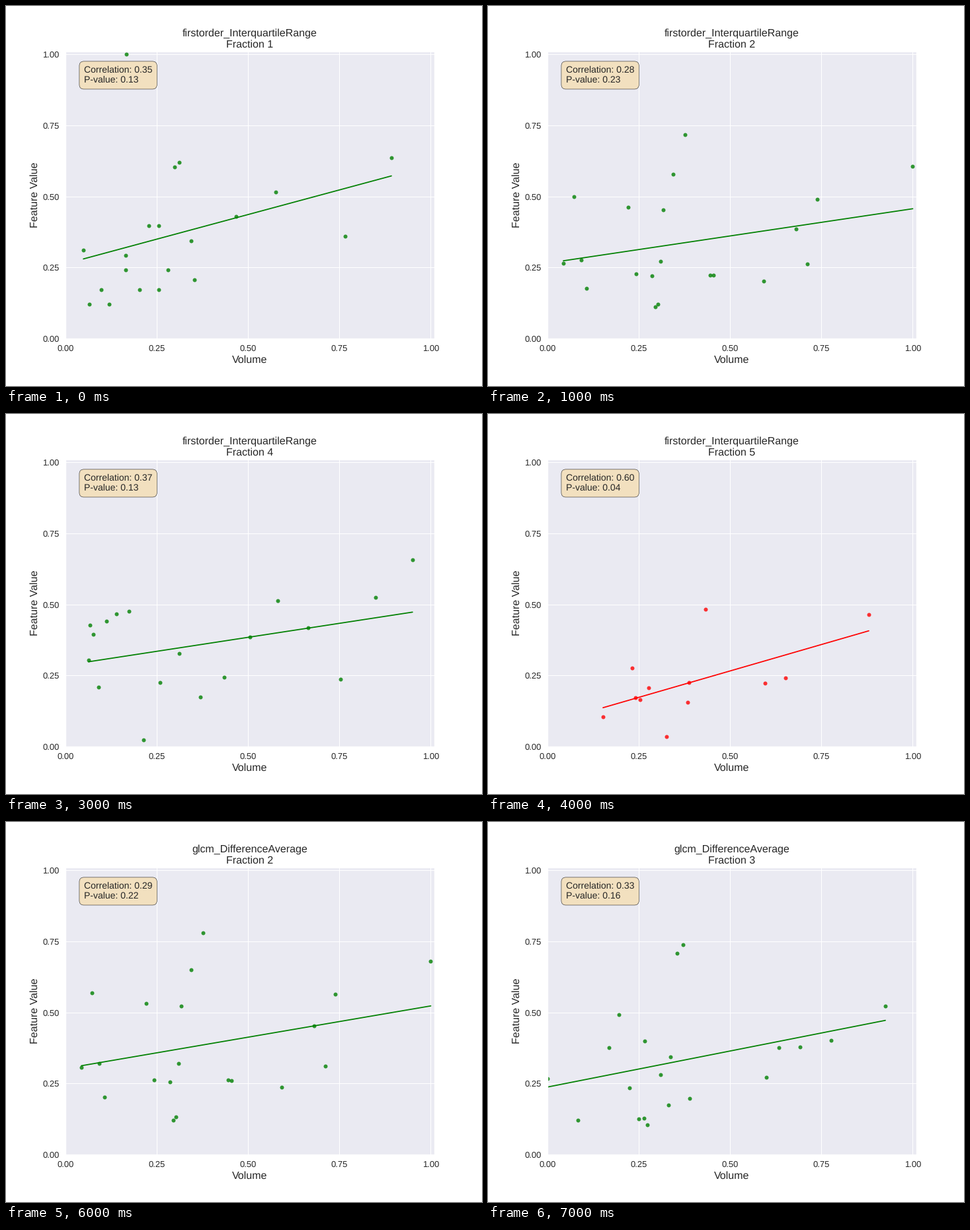
Recreate the animation shown at these times as a matplotlib script. Size 720 px wide and 576 px high, loop 8000 ms.

```python
import numpy as np
import matplotlib.pyplot as plt
from matplotlib.animation import FuncAnimation

plt.rcParams.update({
    "font.family": "Liberation Sans",
    "text.hinting": "none",
    "text.color": "0.15",
    "axes.labelcolor": "0.15",
    "axes.edgecolor": "white",
    "axes.linewidth": 1.25,
    "xtick.color": "0.15",
    "ytick.color": "0.15",
})

STEPS = 58  # the interquartile range moves in steps of 1/58
rng = np.random.default_rng(4)

# Volumes and interquartile steps of the samples, per fraction.
SAMPLES = {
    1: ([.049, .065, .098, .1195, .165, .165, .1665, .203, .228, .2555,
         .2555, .2805, .2987, .3113, .344, .353, .467, .5756, .7656, .8923],
        [18, 7, 10, 7, 17, 14, 58, 10, 23, 23,
         10, 14, 35, 36, 20, 12, 25, 30, 21, 37]),
    2: ([.0434, .0724, .0923, .1068, .2208, .2425, .286, .295, .3023, .3095,
         .3167, .344, .3765, .4453, .4543, .592, .6805, .7113, .7385, 1],
        [15.2, 28.8, 15.9, 10.2, 26.7, 13.1, 12.7, 6.5, 7, 15.8,
         26.2, 33.5, 41.6, 13, 12.9, 11.8, 22.5, 15.3, 28.5, 35.3]),
    3: ([0, .0833, .1683, .1955, .2244, .25, .2643, .2661, .2733, .3095,
         .3312, .3367, .3548, .371, .3891, .599, .6335, .6914, .7765, .925],
        [14, 7, 19, 25, 12, 7, 7, 20, 6, 14,
         9, 17, 37, 39, 10, 13, 18, 18, 19, 25]),
    4: (.063 + .887 * np.linspace(0, 1, 18) ** 2, rng.integers(2, 32, 18)),
    5: ([.152, .2317, .2407, .2534, .2769, .3258,
         .3837, .3873, .4326, .5955, .6516, .8796],
        [6, 16, 10, 9.5, 12, 2, 9, 13, 28, 13, 14, 27]),
}

IQR, DIFF = "firstorder_InterquartileRange", "glcm_DifferenceAverage"

# Feature, fraction, correlation, p-value
SLIDES = [
    (IQR, 1, .35, .13),
    (IQR, 2, .28, .23),
    (IQR, 3, .26, .26),
    (IQR, 4, .37, .13),
    (IQR, 5, .60, .04),
    (DIFF, 1, .47, .04),
    (DIFF, 2, .29, .22),
    (DIFF, 3, .33, .16),
]


def line(x, y, at):
    return np.polyval(np.polyfit(x, y, 1), at)


def tilt(x, y, corr):
    """Keep the scatter around the trend, but give it this correlation."""
    rest = y - line(x, y, x)
    slope = corr / np.sqrt(1 - corr ** 2) * rest.std() / x.std()
    return y.mean() + slope * (x - x.mean()) + rest


def sample(feature, fraction, corr):
    x, steps = map(np.array, SAMPLES[fraction])
    y = steps / STEPS
    if feature == DIFF:
        # The two features rise together, this one levelling off.
        y = 1.38 * y - .35 * y ** 2 - .03
    return x, tilt(x, y, corr)


fig = plt.figure(figsize=(10, 8), dpi=72, facecolor="white")
ax = fig.add_axes([.125, .125, .775, .755], facecolor="#EAEAF2")
ax.set(xlim=(0, 1.01), ylim=(0, 1.01))
ticks = np.linspace(0, 1, 5)
labels = [f"{t:.2f}" for t in ticks]
ax.set_xticks(ticks, labels)
ax.set_yticks(ticks, labels)
ax.tick_params(length=0, pad=9.5, labelsize=13)
ax.grid(color="white", linewidth=1)
ax.set_axisbelow(True)
ax.set_xlabel("Volume", fontsize=16)
ax.set_ylabel("Feature Value", fontsize=16)

title = ax.set_title("", fontsize=16, pad=6)
dots = ax.scatter([], [], s=36, linewidths=0, alpha=.8)
trend, = ax.plot([], [], linewidth=1.75, solid_capstyle="round")
note = ax.text(.05, .95, "", transform=ax.transAxes, fontsize=14, va="top",
               bbox=dict(boxstyle="round,pad=0.5", facecolor="wheat",
                         edgecolor="black", linewidth=.6, alpha=.8))


def update(i):
    feature, fraction, corr, p = SLIDES[i]
    x, y = sample(feature, fraction, corr)
    color = "red" if corr > .5 else "green"
    ends = np.array([x.min(), x.max()])

    dots.set_offsets(np.column_stack([x, y]))
    dots.set_facecolor(color)
    trend.set_data(ends, line(x, y, ends))
    trend.set_color(color)
    title.set_text(f"{feature}\nFraction {fraction}")
    note.set_text(f"Correlation: {corr:.2f}\nP-value: {p:.2f}")
    return dots, trend, title, note


anim = FuncAnimation(fig, update, frames=len(SLIDES), interval=1000,
                     repeat=True, repeat_delay=0, blit=False)
plt.show()
```
